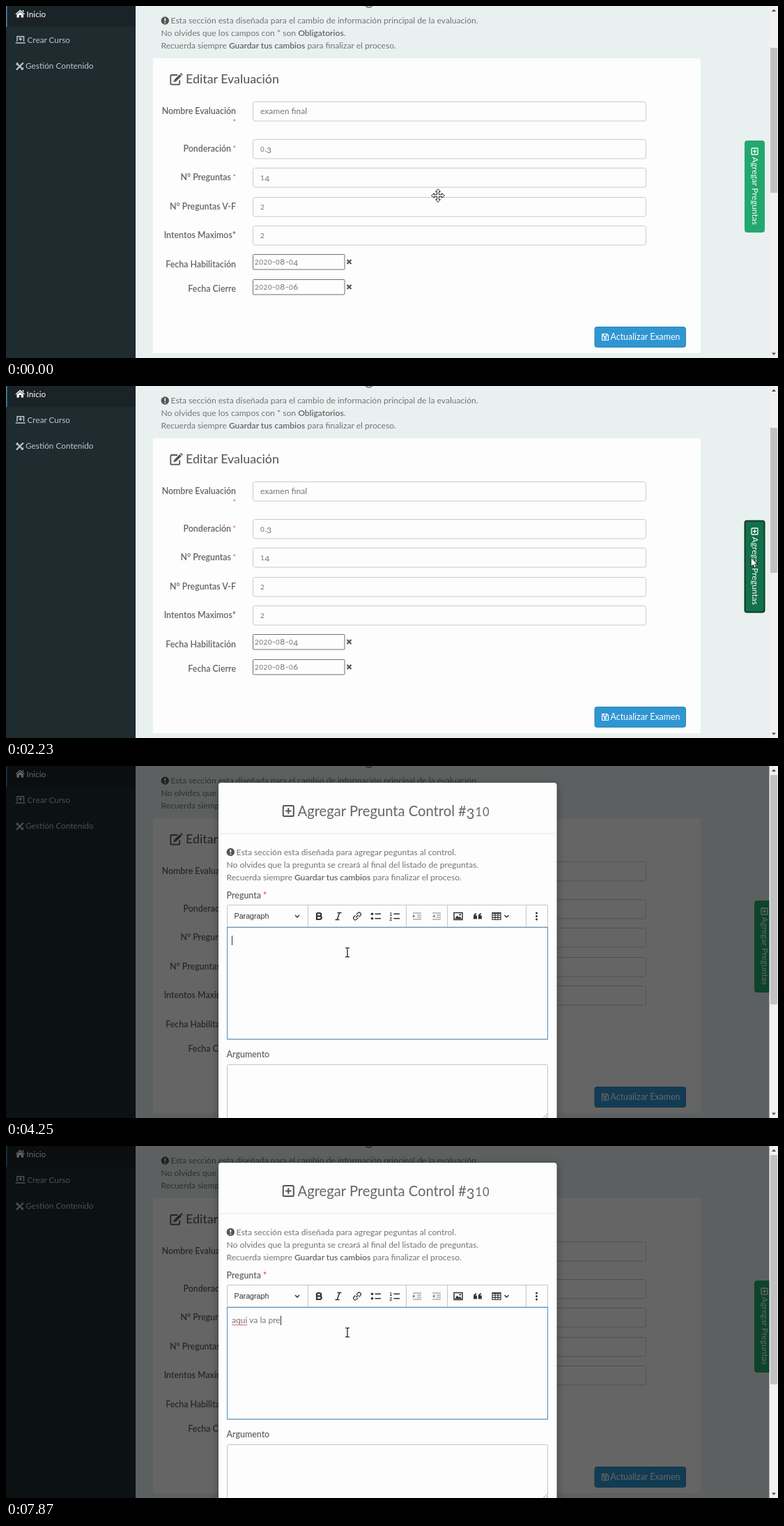
An HTML page that plays this animation: 1108x505 px, repeating every 8 s.

```html
<!DOCTYPE html>
<html lang="es">
<head>
<meta charset="utf-8">
<title>Editar Evaluación</title>
<style>
  html, body { margin: 0; width: 100%; height: 100%; overflow: hidden; background: #e9f1f0; }
  svg { display: block; width: 100vw; height: 100vh; }
  text { font: 12.1px Lato, "Open Sans", sans-serif; fill: #747474; white-space: pre; }
  .b, .label { font-weight: 600; fill: #636363; }
  .label { font-size: 12.4px; }
  .end { text-anchor: end; }
  .req { fill: #e2574c; }
  .menu { font-size: 11.8px; fill: #b8c7ce; }
  .head { font-size: 17.8px; font-weight: 500; fill: #5c5c5c; }
  .title { font-size: 20.2px; fill: #666; }
  .fig { letter-spacing: .05em; }
  .white { fill: #fff; }
  .line { fill: none; stroke: currentColor; }
</style>
</head>
<body>
<svg id="stage" viewBox="0 0 1108 505" preserveAspectRatio="none">
  <defs>
    <g id="info">
      <circle r="5.7" fill="#555"/>
      <path d="M0-3.6V.8M0 2.2V3.8" stroke="#fff" stroke-width="1.7"/>
    </g>
    <g id="plus" class="line">
      <rect x="-7.5" y="-7.5" width="15" height="15" rx="1.5"/>
      <path d="M-4.2 0H4.2M0-4.2V4.2"/>
    </g>
    <path id="cross" d="M-3-3 3 3M3-3-3 3" stroke="#555" stroke-width="2.2"/>
    <path id="chevron" class="line" d="M-3-1.5 0 1.5 3-1.5" stroke-width="1.5"/>
    <path id="arrow" d="M0 0V13.2L3.1 10.4 5.2 15 7.3 14 5.3 9.6H9.4Z" fill="#fff" stroke="#111" stroke-width=".9"/>
    <path id="move" d="M0-9.5 3.4-5.6H1.3V-1.3H5.6V-3.4L9.5 0 5.6 3.4V1.3H1.3V5.6H3.4L0 9.5-3.4 5.6H-1.3V1.3H-5.6V3.4L-9.5 0-5.6-3.4V-1.3H-1.3V-5.6H-3.4Z" fill="#fff" stroke="#222"/>
    <path id="beam" class="line" d="M-3-6.5H-1L0-5.5 1-6.5H3M0-5.5V5.5M-3 6.5H-1L0 5.5 1 6.5H3" stroke="#222" stroke-width="1.1"/>
  </defs>

  <g id="page">
    <rect width="1108" height="505" fill="#e9f1f0"/>
    <path d="M516 0Q521 4 525.5 0" class="line" stroke-width="1.4" color="#666"/>

    <rect width="186" height="505" fill="#1e2b2f"/>
    <rect width="186" height="30" fill="#1a2428"/>
    <rect width="1.5" height="30" fill="#3c8dbc"/>
    <path d="M13.5 11.5 20.3 5.5 27 11.5 26 12.3 20.3 7.4 14.5 12.3ZM15.5 12.3 20.3 8.4 25 12.3V16.5H21.8V13H18.8V16.5H15.5ZM23.7 6H25.3V9L23.7 7.6Z" fill="#fff"/>
    <text class="menu white" x="29.5" y="15.5">Inicio</text>
    <g class="line" color="#b8c7ce" stroke-width="1.5">
      <path d="M16 51V43.7H25.5V51M13.7 53H27.7M20.7 45V49.8M18.3 47.4H23.1"/>
      <path d="M15 82 24.5 91.3M24.8 81.5 15 91.5" stroke-width="2.3"/>
      <path d="M14.5 84.5 17.5 81.5M22 91.5 25 88.5"/>
    </g>
    <text class="menu" x="30.5" y="52.5">Crear Curso</text>
    <text class="menu" x="28" y="90">Gestión Contenido</text>

    <use href="#info" x="228.3" y="21"/>
    <text x="236.5" y="25">Esta sección esta diseñada para el cambio de información principal de la evaluación.</text>
    <text x="222.5" y="43">No olvides que los campos con * son <tspan class="b">Obligatorios</tspan>.</text>
    <text x="222.5" y="61">Recuerda siempre <tspan class="b">Guardar tus cambios</tspan> para finalizar el proceso.</text>

    <rect x="211" y="75" width="786" height="423" fill="#fdfdfe"/>
    <g class="line" color="#555" stroke-width="1.8">
      <path d="M246 99H238Q236.3 99 236.3 100.7V111Q236.3 112.7 238 112.7H247.5Q249.2 112.7 249.2 111V106.5"/>
      <path d="M242.5 107.2 250.6 99.2M251.3 98.5 252.6 97.2" stroke-width="3.6"/>
    </g>
    <path d="M240.3 109.3 241.2 105.9 243.7 108.4Z" fill="#555"/>
    <text class="head" x="258" y="111">Editar Evaluación</text>
    <g id="form"></g>

    <rect x="845" y="460.5" width="130.5" height="29" rx="3" fill="#2f96d2" stroke="#2b86be"/>
    <g class="line" color="#fff" stroke-width="1.2">
      <path d="M855.6 470.5H862.5L864.5 472.5V479.5H855.6ZM857.5 470.8V473.8H861.8V470.8"/>
      <circle cx="860" cy="476.7" r="1.3"/>
    </g>
    <text class="white" x="867.5" y="479" style="font-size:12.4px">Actualizar Examen</text>

    <g id="tab">
      <rect id="tabBox" x="1060.5" y="193.5" width="28" height="131" rx="3"/>
      <use href="#plus" transform="translate(1074.5 208.5) scale(.6)" color="#fff" stroke-width="2.2"/>
      <text class="white" transform="translate(1070.5 216.5) rotate(90)">Agregar Preguntas</text>
    </g>
  </g>

  <g id="modal">
    <rect width="1108" height="505" opacity=".6"/>
    <rect x="305" y="24" width="485.5" height="500" rx="4" fill="#fdfdfe" style="filter:drop-shadow(0 3px 6px rgba(0,0,0,.35))"/>
    <path d="M305 97H790.5" stroke="#e6e7ee"/>
    <use href="#plus" x="405.3" y="64.5" color="#555" stroke-width="2"/>
    <text class="title num" x="418.5" y="71.5">Agregar Pregunta Control #310</text>
    <use href="#info" x="322.3" y="123.5"/>
    <text x="330.5" y="127.5">Esta sección esta diseñada para agregar peguntas al control.</text>
    <text x="316.5" y="145.5">No olvides que la pregunta se creará al final del listado de preguntas.</text>
    <text x="316.5" y="163.5">Recuerda siempre <tspan class="b">Guardar tus cambios</tspan> para finalizar el proceso.</text>
    <text class="label" x="316.5" y="190">Pregunta <tspan class="req">*</tspan></text>

    <rect x="317.5" y="199.5" width="460" height="192.5" rx="1.5" fill="#fdfdfd" stroke="#c6c7c0"/>
    <path d="M317.5 231H777.5M433.5 200V231M574.5 200V231M633.5 200V231M746.5 200V231" stroke="#c6c7c0"/>
    <text x="327.5" y="219" style="font:10.7px 'Liberation Sans',Arial,sans-serif;fill:#333">Paragraph</text>
    <g id="tools"></g>
    <rect id="focus" x="317.5" y="231.5" width="460" height="160.5" class="line" color="#4b8fc6"/>
    <text id="typed" x="324" y="254"></text>
    <path id="squiggle" class="line" color="#d8524a"/>
    <rect id="caret" y="243.5" width="1" height="13.5" fill="#333"/>

    <text class="label" x="316.5" y="418">Argumento</text>
    <rect x="317.5" y="428.5" width="460" height="90" rx="2" fill="#fdfdfd" stroke="#c4c5cc"/>
    <path d="M771 505 777 499M775 505 777 503" stroke="#888" stroke-width=".8"/>
  </g>

  <rect x="1095.5" width="12.5" height="505" fill="#f1f1f1"/>
  <rect id="thumb" x="1097" width="10" fill="#c1c1c1"/>
  <path d="M1099 8 1102 4.5 1105 8ZM1099 497.5H1105L1102 501Z" fill="#505050"/>
  <use id="cursor"/>
</svg>

<script>
const LOOP = 8000, PRESS = 1980, OPEN = 2270, CLICK = 3960, BLUR = 4040;
const $ = id => document.getElementById(id);
const show = (el, on) => el.setAttribute('visibility', on ? 'visible' : 'hidden');
const set = (el, attrs) => { for (const k in attrs) el.setAttribute(k, attrs[k]); };

// Form rows: label, value, box top, box height, label baseline, required mark
const rows = [
  ['Nombre Evaluación', 'examen final', 137, 28, 155, 171],
  ['Ponderación', '0.3', 191, 28, 209, 209],
  ['N° Preguntas', '14', 232, 28, 250, 250],
  ['N° Preguntas V-F', '2', 274, 28, 291.5],
  ['Intentos Maximos*', '2', 315, 28, 333],
  ['Fecha Habilitación', '2020-08-04', 356, 22, 374.5],
  ['Fecha Cierre', '2020-08-06', 392, 22, 410]
];

function formRow([label, value, top, h, base, mark]) {
  const date = h < 28;
  const w = date ? 131.5 : 564;
  const right = mark === base ? 323 : 330;
  const star = mark ? `<text class="req" x="325.5" y="${mark}" style="font-size:11px">*</text>` : '';
  const clear = date ? `<use href="#cross" x="492.5" y="${top + 11}"/>` : '';
  return `<text class="label end" x="${right}" y="${base}">${label}</text>${star}${clear}
    <rect x="354.5" y="${top + .5}" width="${w}" height="${h - .5}" rx="${date ? 1 : 3}"
      fill="#fdfdfd" stroke="${date ? '#707070' : '#cacbc6'}"/>
    <text class="num" x="${date ? 357 : 365}" y="${top + h / 2 + 4.3}">${value}</text>`;
}
$('form').innerHTML = rows.map(formRow).join('');

// Old-style figures: 0-2 at x-height, 3-5, 7 and 9 hang below the line
const figure = d => {
  const look = '012'.includes(d) ? 'font-size="82%"' : '34579'.includes(d) ? 'baseline-shift="-18%"' : '';
  return `<tspan class="fig" ${look}>${d}</tspan>`;
};
document.querySelectorAll('.num').forEach(el => {
  el.innerHTML = el.textContent.replace(/[\d-]/g, figure);
});

// Toolbar icons, each centred on its own origin
const icon = (x, body, color = '#333') =>
  `<g class="line" color="${color}" stroke-width="1.5" transform="translate(${x} 215.5)">${body}</g>`;
const path = (d, extra = '') => `<path d="${d}" ${extra}/>`;
const solid = 'fill="currentColor" stroke="none"';
const indent = dir => path('M-6-4.5H6M0-1.5H6M0 1.5H6M-6 4.5H6', 'stroke-width="1.2"') +
  path(dir > 0 ? 'M-6-2.5-2.5 0-6 2.5Z' : 'M-2.5-2.5-6 0-2.5 2.5Z', solid);
const quote = x => path(`M${x} 0Q${x} -3.5 ${x + 4} -4.5L${x + 4.5} -3.3Q${x + 2.7} -2.3 ${x + 2.7} -1H${x + 5}V4H${x}Z`, solid);
const dot = (x, y, r = 1.5) => `<circle cx="${x}" cy="${y}" r="${r}" ${solid}/>`;
const small = (y, n) => `<text x="-7.5" y="${y}" stroke="none" style="font:bold 6.5px 'Liberation Sans',sans-serif;fill:#333">${n}</text>`;
const items = path('M-1.5-3.3H7M-1.5 3.3H7');

$('tools').innerHTML = [
  icon(418, '<use href="#chevron"/>'),
  icon(449, path('M-3-4.5H.8Q3.2-4.5 3.2-2.3T.8-.2H-3M.8-.2Q3.8-.2 3.8 2.1T1 4.5H-3V-4.5', 'stroke-width="2.2"')),
  icon(477, path('M-1.5-5H4.5M-4.5 5H1.5M1.7-5-1.7 5')),
  icon(504, path('M-1-2.5H-4A2.5 2.5 0 0 0-4 2.5H-.5M1 2.5H4A2.5 2.5 0 0 0 4-2.5H.5M-2.5 0H2.5', 'transform="rotate(-45)" stroke-width="1.3"')),
  icon(531, dot(-5.5, -3.3, 1.8) + dot(-5.5, 3.3, 1.8) + items),
  icon(558, small(-1, 1) + small(6, 2) + items),
  icon(590, indent(1), '#808080'),
  icon(618, indent(-1), '#808080'),
  icon(649, path('M-6-5H6V5H-6Z') + path('M-5 4-1.5-1 1 1.8 2.8.2 5 4Z', solid) + dot(2.7, -2.3, 1.2)),
  icon(677, quote(-6) + quote(.8)),
  icon(704, path('M-6-5H6V5H-6ZM-2-5V5M2-5V5M-6-1.5H6M-6 1.8H6', 'stroke-width="1.2"') + path('M-6-4.5H6', 'stroke-width="2"')),
  icon(718.5, '<use href="#chevron"/>'),
  icon(761.5, dot(0, -4.5) + dot(0, 0) + dot(0, 4.5))
].join('');

// Pointer path: time, x, y
const track = [
  [130, 620, 272], [800, 1030, 233], [970, 1030, 233], [1390, 1058, 240], [1770, 1069, 246],
  [2780, 1069.5, 246], [3120, 588, 269], [3450, 588, 269], [3620, 490, 267.5]
];
function pointer(t) {
  const i = track.findIndex(k => k[0] > t);
  if (i === 0) return track[0].slice(1);
  if (i < 0) return track[track.length - 1].slice(1);
  const [t0, x0, y0] = track[i - 1], [t1, x1, y1] = track[i];
  const p = (t - t0) / (t1 - t0), e = p * p * (3 - 2 * p);
  return [x0 + (x1 - x0) * e, y0 + (y1 - y0) * e];
}
const inside = (x, y, l, t, r, b) => x > l && x < r && y > t && y < b;
function shape(x, y, open) {
  if (open) return inside(x, y, 317, 231, 778, 392) ? 'beam' : 'arrow';
  if (rows.some(r => inside(x, y, 354, r[2], 918, r[2] + r[3]))) return 'beam';
  return inside(x, y, 211, 75, 997, 498) ? 'move' : 'arrow';
}

const message = 'aqui va la pre';
const strokes = [5730, 5840, 5950, 6060, 6270, 6530, 6740, 6990, 7160, 7200, 7240, 7490, 7750, 7870];
const blinks = [CLICK, 4420, 4930, 5470, strokes[0]];

const zigzag = w => {
  let d = 'M324 257.5';
  for (let x = 2, k = 0; x <= w; x += 2, k++) d += `L${324 + x} ${k % 2 ? 257.5 : 255.8}`;
  return d;
};

function tabStyle(t, x) {
  if (t >= BLUR) return ['#22a86e', '#22a86e'];
  if (t >= OPEN) return ['#158253', '#04150d'];
  if (t >= PRESS) return ['#12704a', '#0a3a26'];
  return x >= 1060 ? ['#1c955f', '#1a8a58'] : ['#22a86e', '#22a86e'];
}

function draw(t) {
  const open = t >= OPEN;
  const [x, y] = pointer(t);
  show($('modal'), open);
  set($('thumb'), open ? { y: 13, height: 329 } : { y: 60, height: 208 });
  set($('tab'), { transform: `translate(${open ? 14 : 0} 0)` });
  const [fill, stroke] = tabStyle(t, x);
  set($('tabBox'), { fill, stroke, 'stroke-width': t >= PRESS && t < BLUR ? 2 : 1 });
  set($('cursor'), { href: '#' + shape(x, y, open), transform: `translate(${x} ${y})` });

  const count = strokes.filter(s => s <= t).length;
  const typed = $('typed');
  typed.textContent = message.slice(0, count);
  const width = count ? typed.getComputedTextLength() : 0;
  show($('focus'), open && t >= CLICK);
  show($('caret'), blinks.filter(b => b <= t).length % 2 === 1);
  set($('caret'), { x: Math.round(324 + width) });
  show($('squiggle'), t >= strokes[4]);
}

$('typed').textContent = 'aqui';
set($('squiggle'), { d: zigzag($('typed').getComputedTextLength()) });

const start = performance.now();
function tick() {
  draw((performance.now() - start) % LOOP);
  requestAnimationFrame(tick);
}
tick();
</script>
</body>
</html>
```
